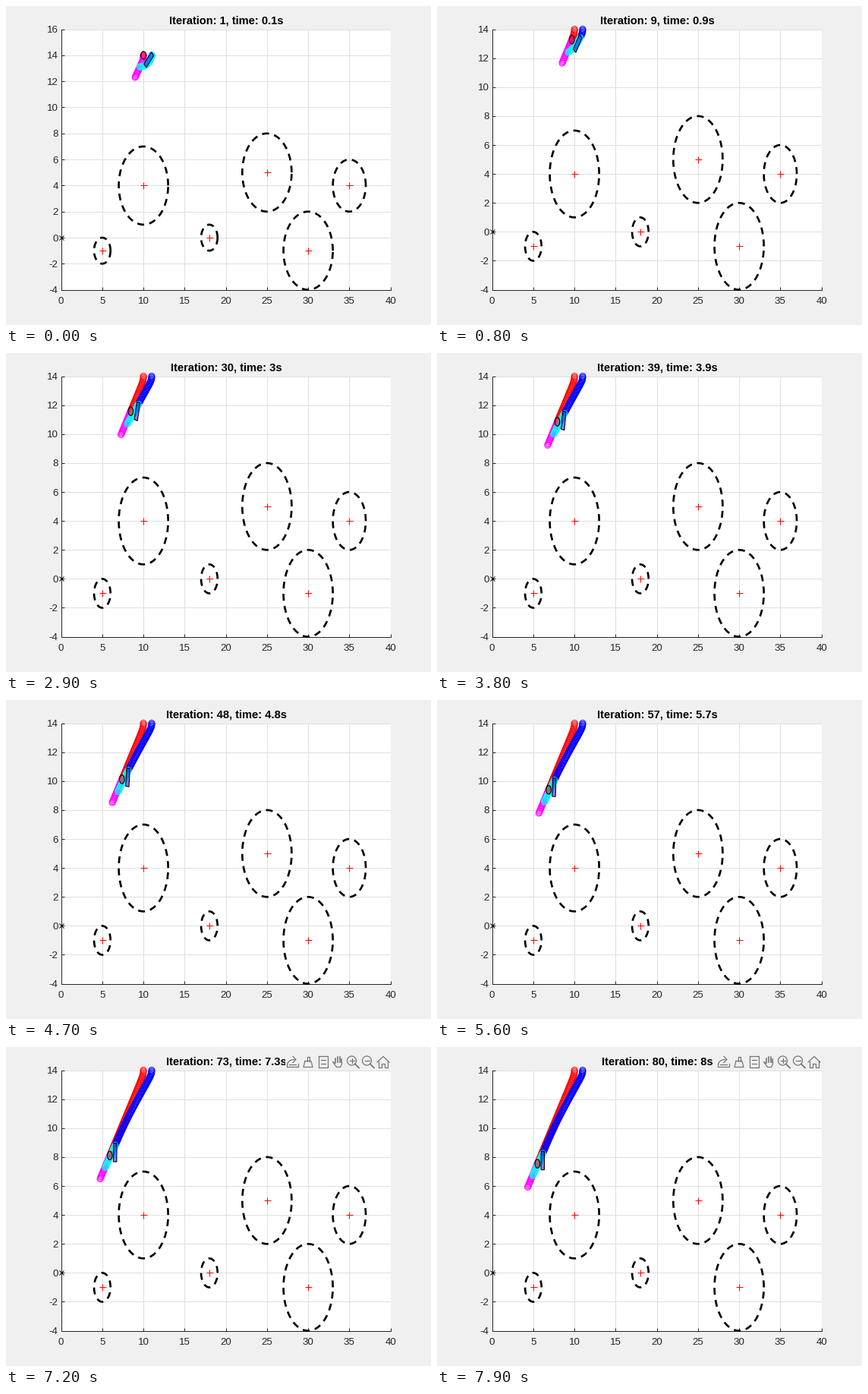
Recreate the animation shown at these times as a matplotlib script. Size 560x420 px, loop 8000 ms.

```python
import numpy as np
import matplotlib.pyplot as plt
from matplotlib.animation import FuncAnimation
from matplotlib.patches import Circle, Polygon, Rectangle

W, H, DPI = 560, 420, 100
PX = 72 / DPI                 # one pixel in points
FRAMES, STEP_MS, DT = 80, 100, 0.1
HORIZON, LAG = 20, 10
TOOLBAR_FROM = 60
BG, INK, GRID, ICON = "#f0f0f0", "#262626", "#dfdfdf", "#737373"

plt.rcParams["font.family"] = "Liberation Sans"
plt.rcParams["axes.unicode_minus"] = False


def leader_path(n, gain=3.5):
    """Unit-speed vehicle that starts facing down and turns to the origin."""
    pos, heading = np.array([10.0, 14.0]), -np.pi / 2
    path = [pos]
    for _ in range(n):
        pos = pos + DT * np.array([np.cos(heading), np.sin(heading)])
        path.append(pos)
        goal = np.arctan2(-pos[1], -pos[0])
        heading += gain * DT * (goal - heading)
    return np.array(path)


def settle(t):
    """Fades from 1 to 0 as the follower falls in line."""
    return np.exp(-(t / 2.7) ** 1.3)


def follower_path():
    """Starts beside the leader and drops in behind it."""
    t = np.arange(FRAMES) * DT
    dx = 0.65 + 0.35 * np.exp(-(t / 4.5) ** 3)
    dy = 0.72 * (1 - settle(t))
    return leader[:FRAMES] + np.column_stack([dx, dy])


def follower_plan(i):
    """Bowed curve from the follower to a point on the leader's line."""
    t = i * DT
    start = follower[i]
    tip = leader[i + LAG] + 0.4 * t * np.exp(-t / 1.8) * np.array([0.8, -0.3])
    ctrl = (start + tip) / 2 + np.exp(-t / 0.8) * np.array([0.43, -0.42])
    s = np.linspace(0, 1, HORIZON + 1)[:, None]
    return (1 - s) ** 2 * start + 2 * s * (1 - s) * ctrl + s ** 2 * tip


def body_corners(i):
    angle = np.radians(270 - 45 * settle(i * DT))
    along = np.array([np.cos(angle), np.sin(angle)])
    side = 0.2 * np.array([-along[1], along[0]])
    rear, front = follower[i] - 0.15 * along, follower[i] + 1.13 * along
    return np.array([rear + side, front + side, front - side, rear - side])


leader = leader_path(FRAMES + HORIZON)
follower = follower_path()

fig = plt.figure(figsize=(W / DPI, H / DPI), dpi=DPI, facecolor=BG)
ax = fig.add_axes([72.6 / W, 46.4 / H, 434 / W, 343 / H])
ax.set_xlim(0, 40)
ax.set_xticks(range(0, 41, 5))
ax.set_axisbelow(True)
ax.grid(color=GRID, lw=PX)
ax.spines[["top", "right"]].set_visible(False)
for name in ("left", "bottom"):
    ax.spines[name].set(color=INK, linewidth=PX)
ax.tick_params(direction="in", length=4.3 * PX, width=PX, color=INK,
               labelcolor=INK, labelsize=13.33 * PX)
ax.tick_params(axis="x", pad=9.2 * PX)
ax.tick_params(axis="y", pad=4 * PX)

# Obstacles: centre and radius
turn = np.linspace(0, 2 * np.pi, 200)
for cx, cy, r in [(10, 4, 3), (25, 5, 3), (35, 4, 2),
                  (18, 0, 1), (30, -1, 3), (5, -1, 1)]:
    ax.plot(cx + r * np.cos(turn), cy + r * np.sin(turn), color="k",
            lw=2.67 * PX, dashes=(3.4, 2.6), dash_capstyle="butt",
            clip_on=False, zorder=3)
    ax.plot(cx, cy, "+", color="r", ms=9 * PX, mew=PX, zorder=3)
ax.plot(0, 0, "x", color="k", ms=6 * PX, mew=PX, clip_on=False, zorder=4)


def rings(color, z):
    # Two antialias entries keep the rings off the whole-pixel marker path
    return ax.scatter([], [], s=(8 * PX) ** 2, facecolors="none",
                      edgecolors=color, linewidths=PX, clip_on=False,
                      antialiaseds=[True, True], zorder=z)


trail_a, trail_b = rings("#ff0000", 5), rings("#0000ff", 6)
plan_a, plan_b = rings("#ff00ff", 7), rings("#00ffff", 8)
solid = dict(ec="k", lw=1.1 * PX, clip_on=False)
disc = ax.add_patch(Circle((0, 0), 0.3, fc=(1, 0, 0, 0.5), zorder=9, **solid))
body = ax.add_patch(Polygon(np.zeros((4, 2)), fc=(0, 0, 1, 0.5), zorder=10,
                            **solid))

# Pixel-space layer for the title and the toolbar
top = fig.add_axes([0, 0, 1, 1], zorder=5)
top.set(xlim=(0, W), ylim=(H, 0))
top.axis("off")
title = top.text(290.3, 23.6, "", ha="center", va="baseline", color="k",
                 weight="bold", size=14.67 * PX, zorder=1)
toolbar = [top.add_patch(Rectangle((368, 9), 139, 20, fc=BG, ec="none",
                                   zorder=2))]


def stroke(cx, xs, ys, lw=1.2):
    """Polyline around an icon centre."""
    toolbar.extend(top.plot(cx + np.array(xs), 19.5 + np.array(ys),
                            color=ICON, lw=lw * PX, zorder=3))


def export_icon(cx):
    stroke(cx, [-7, -7, 8, 8], [2, 6, 6, 2])
    a = np.linspace(np.pi, 1.5 * np.pi, 12)
    stroke(cx, 3 + 9 * np.cos(a), 3 + 6 * np.sin(a))
    stroke(cx, [1, 5, 1], [-7, -3, 1])
    stroke(cx, [-4, 5], [3, 3])


def brush_icon(cx):
    stroke(cx, [-1.5, -1.5, 1.5, 1.5], [-1, -7, -7, -1])
    stroke(cx, [-4, 4, 6, -6, -4], [-1, -1, 7, 7, -1])


def tip_icon(cx):
    stroke(cx, [-6, 6, 6, -6, -6], [-7.5, -7.5, 7.5, 7.5, -7.5])
    for y in (-2.5, 2.5):
        stroke(cx, [-3, 3], [y, y])


def hand_icon(cx):
    for k, length in enumerate((5, 7, 6.5, 4)):
        x = -3.5 + 2.8 * k
        stroke(cx, [x, x], [0, -length], lw=1.6)
    stroke(cx, [-3.5, -7, -2, 3, 5, 5], [2, 0, 7, 7, 3, 0])


def zoom_icon(cx, plus):
    stroke(cx, -1.5 + 6 * np.cos(turn), -1.5 + 6 * np.sin(turn))
    stroke(cx, [2.8, 8], [2.8, 8], lw=1.7)
    stroke(cx, [-4.5, 1.5], [-1.5, -1.5])
    if plus:
        stroke(cx, [-1.5, -1.5], [-4.5, 1.5])


def home_icon(cx):
    stroke(cx, [-8, 0, 8], [0.5, -7, 0.5])
    stroke(cx, [-6, -6, -2, -2, 2, 2, 6, 6], [-1, 7.5, 7.5, 2, 2, 7.5, 7.5, -1])


export_icon(377)
brush_icon(398)
tip_icon(417.5)
hand_icon(437.5)
zoom_icon(457, True)
zoom_icon(477, False)
home_icon(497)


def update(i):
    high = 16 if i == 0 else 14
    ax.set_ylim(-4, high)
    ax.set_yticks(range(-4, high + 1, 2))
    trail_a.set_offsets(leader[:i + 1])
    trail_b.set_offsets(follower[:i + 1])
    plan_a.set_offsets(leader[i:i + HORIZON + 1])
    plan_b.set_offsets(follower_plan(i))
    disc.center = leader[i]
    body.set_xy(body_corners(i))
    title.set_text(f"Iteration: {i + 1}, time: {(i + 1) / 10:g}s")
    for part in toolbar:
        part.set_visible(i >= TOOLBAR_FROM)
    return []


anim = FuncAnimation(fig, update, frames=FRAMES, interval=STEP_MS,
                     init_func=lambda: update(0), repeat=True, repeat_delay=0)
plt.show()
```
